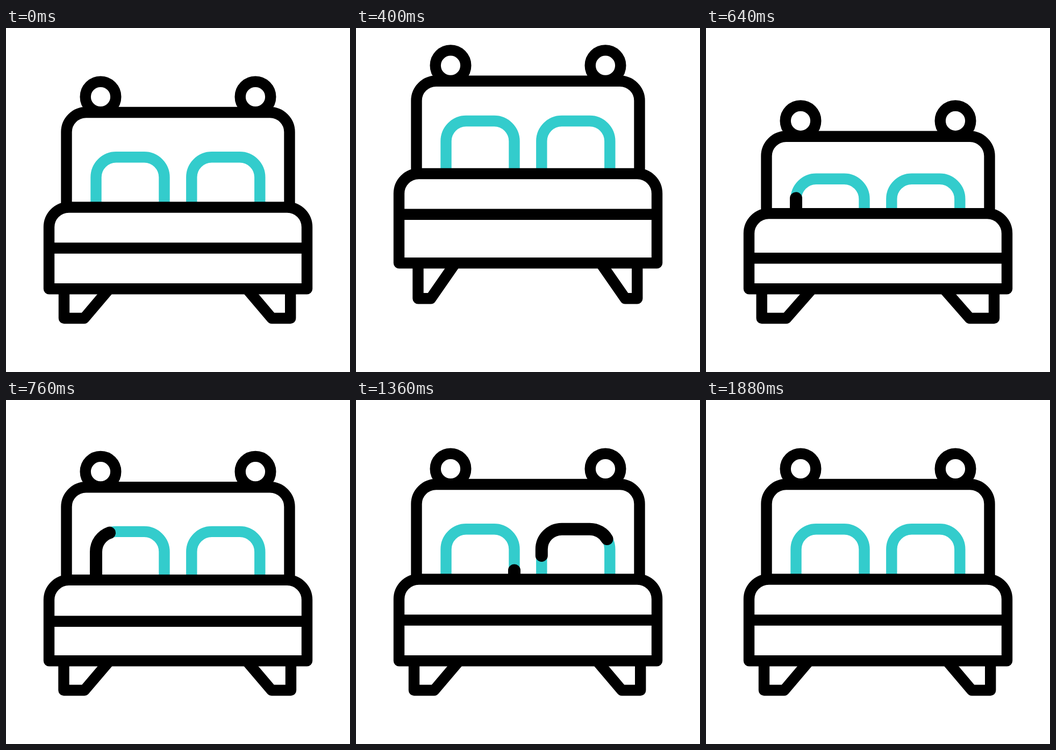
Write an HTML page with a canvas that moves like this. It is 640 px wide and 640 px high and loops after 2000 ms.

```html
<!DOCTYPE html>
<html lang="en">
<head>
<meta charset="utf-8">
<title>Bouncing bed</title>
<style>
html, body { margin: 0; height: 100%; overflow: hidden; background: #fff; }
canvas { display: block; }
</style>
</head>
<body>
<canvas id="stage" width="640" height="640"></canvas>
<script>
const ctx = document.getElementById('stage').getContext('2d');
const LOOP = 2000, STEP = 40;

// Heights of the parts, then x positions of the legs
const rest = { head: 157, pillow: 240.2, top: 333.5, mid: 409.5, base: 485.2, foot: 540,
  legL: 108, legR: 529.2, heel: 145.5, hip: 192 };
const jump = { head: 98.7, pillow: 173, top: 271, mid: 346.7, base: 437.2, foot: 503.3,
  legL: 115.5, legR: 523.2, heel: 139, hip: 185 };
const squash = { head: 207, pillow: 285.5, top: 346.5, mid: 430.5, base: 485.2, foot: 540,
  legL: 103.2, legR: 536.8, heel: 149.8, hip: 198 };

function ease(t, from, to) {
  const s = Math.min(1, Math.max(0, (t - from) / (to - from)));
  return s * s * (3 - 2 * s);
}

function mix(a, b, k) {
  const out = {};
  for (const key in a) out[key] = a[key] + (b[key] - a[key]) * k;
  return out;
}

function poseAt(t) {
  if (t < 400) return mix(rest, jump, ease(t, 120, 400));
  if (t < 600) return mix(jump, squash, ease(t, 400, 600));
  return mix(squash, rest, ease(t, 600, 800));
}

function stroke(path, color = '#000', width = 20.4) {
  ctx.strokeStyle = color;
  ctx.lineWidth = width;
  ctx.stroke(path);
}

// Upside-down U with rounded upper corners, drawn from lower left to lower right
function arch(left, right, top, bottom, r) {
  const p = new Path2D();
  p.moveTo(left, bottom);
  p.lineTo(left, top + r);
  p.arc(left + r, top + r, r, Math.PI, Math.PI * 1.5);
  p.lineTo(right - r, top);
  p.arc(right - r, top + r, r, -Math.PI / 2, 0);
  p.lineTo(right, bottom);
  return p;
}

function line(...points) {
  const p = new Path2D();
  points.forEach(([x, y]) => p.lineTo(x, y));
  stroke(p);
}

function pillow(left, pose, from, to) {
  const r = 37.5, w = 127, bottom = pose.top - 6.5;
  const path = arch(left, left + w, pose.pillow, bottom, r);
  stroke(path, '#33cccc');
  if (to <= from) return;
  const length = 2 * (bottom - pose.pillow - r) + Math.PI * r + w - 2 * r;
  ctx.save();
  ctx.lineCap = 'round';
  ctx.setLineDash([(to - from) * length, 2000]);
  ctx.lineDashOffset = -from * length;
  stroke(path, '#000', 23);
  ctx.restore();
}

function draw(t) {
  const p = poseAt(t);
  ctx.fillStyle = '#fff';
  ctx.fillRect(0, 0, 640, 640);
  ctx.lineJoin = 'round';

  for (const x of [176, 464]) {
    const knob = new Path2D();
    knob.arc(x, p.head - 29, 28.3, 0, Math.PI * 2);
    stroke(knob);
  }
  stroke(arch(112.5, 527.5, p.head, p.top, 36.5));

  pillow(167.5, p, ease(t, 760, 1440), ease(t, 520, 1120));
  pillow(345.3, p, ease(t, 1200, 1880), ease(t, 960, 1560));

  line([p.legL, p.base], [p.legL, p.foot], [p.heel, p.foot], [p.hip, p.base]);
  line([p.legR, p.base], [p.legR, p.foot], [640 - p.heel, p.foot], [640 - p.hip, p.base]);

  const frame = arch(80, 560, p.top, p.base, 37);
  frame.closePath();
  stroke(frame);
  line([80, p.mid], [560, p.mid]);
}

function tick() {
  const t = performance.now() % LOOP;
  draw(Math.floor(t / STEP) * STEP);
  requestAnimationFrame(tick);
}
tick();
</script>
</body>
</html>
```
